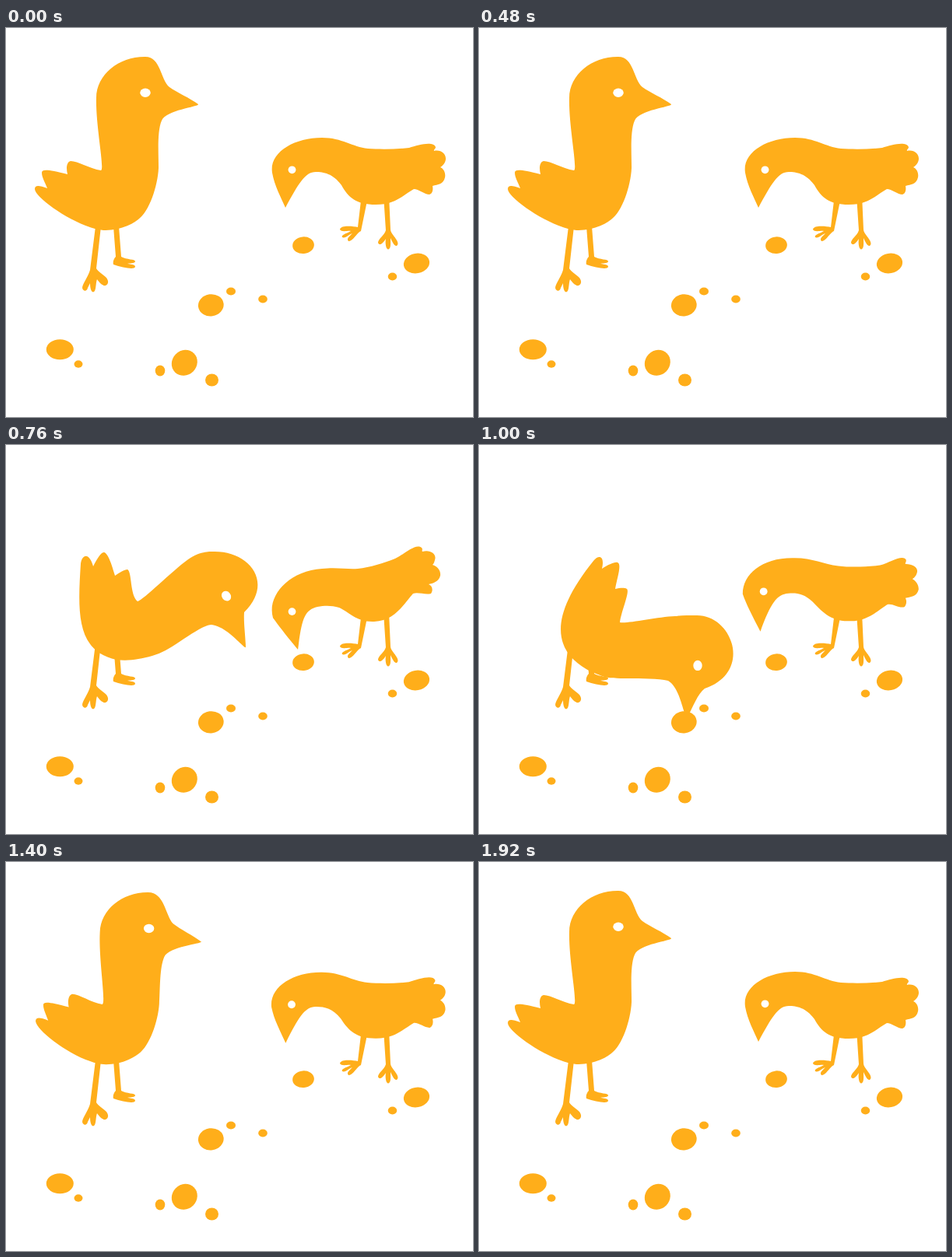
Recreate the animation shown at these times as an HTML page. Size 600 px wide and 500 px high, loop 1960 ms.

```html
<!DOCTYPE html>
<html lang="en">
<head>
<meta charset="utf-8">
<title>Pecking birds</title>
<style>
  html, body { margin: 0; width: 100%; height: 100%; overflow: hidden; background: #fff; }
  svg { display: block; width: 600px; height: 500px; }
</style>
</head>
<body>
<svg viewBox="0 0 600 500" fill="#ffae1a">
  <g id="pellets"></g>
  <!-- left legs -->
  <path d="M115 255L108 311C106 319 98 329 98 334C99 339 104 339 105 334L108 328C108 333 109 339 112 339.500C116 339 115 328 117 323C120 327 124 332 128 331C132 329 132 325 129 321C125 317 118 313 116 309L122 255Z"/>
  <path d="M138 255L145 255L148 294C155 298 166 297 166 300C166 303 158 302 156 303C162 304 166 304 166 307C165 311 150 308 138 304C137 300 139 296 141 294Z"/>
  <!-- right legs -->
  <path d="M456 222L452 256C446 255 430 253 429 259C431 263 440 260 443 261C438 264 430 266 432 269C436 271 441 265 445 264C441 268 437 271 440 274C445 275 451 263 456 261L464 222Z"/>
  <path d="M485 215L488 260C486 267 478 271 478 276C480 281 485 276 488 271C487 276 488 284 491 284.500C495 284 494 276 494 270C496 274 499 281 502 280C506 277 501 271 498 267C496 264 494 262 494 259L492 215Z"/>
  <path id="leftBody"/>
  <ellipse id="leftEye" rx="6.7" ry="5.7" fill="#fff"/>
  <path id="rightBody"/>
  <ellipse id="rightEye" rx="4.9" ry="4.9" fill="#fff"/>
</svg>
<script>
const LOOP = 1960, STEP = 40;
const $ = id => document.getElementById(id);

// cx, cy, rx, ry, tilt
const pellets = [
  [69.300, 413.300, 17.500, 13, 0], [93, 432, 5.500, 4.700, 0],
  [198, 440.500, 6.300, 6.900, 0], [229.300, 430.300, 17.200, 15.800, -45],
  [264.500, 452.500, 8.500, 8, 0], [263.300, 356.300, 16.400, 14.100, -8],
  [289, 338.500, 6, 5, 0], [330, 348.500, 5.800, 4.900, 0],
  [382, 279.200, 13.900, 10.800, -5], [527.500, 302.500, 16.700, 12.800, -10],
  [496.500, 319.500, 5.700, 5, 0]
];
$("pellets").innerHTML = pellets.map(([x, y, rx, ry, tilt]) =>
  `<ellipse rx="${rx}" ry="${ry}" transform="translate(${x} ${y}) rotate(${tilt})"/>`).join("");

// Each bird: three poses (upright, leaning, pecking) and the lean at which each occurs.
// Eye: x, y, tilt
const left = {
  body: $("leftBody"), eye: $("leftEye"),
  nodes: [0, 0.629, 0.983],
  eyes: [[179, 83.3, 0], [283, 194, 50], [281, 283.4, 90]],
  shapes: [
    `M37 207C37 202 42 202 53 206 C50 198 46 192 46 186 C46 181 55 182 79 188
     C77 180 78 172 83 171 C92 171 108 181 122 183 C127 182 115 125 116 90
     C116 60 145 37 178 37 C199 36 198 66 210 76 C220 83 236 90 247 98
     C249 101 206 105 200 119 C194 133 196 160 196 180 C195 203 184 236 170 246
     C159 255 142 260 128 260 C97 260 37 219 37 207Z`,
    `M96 152C98 140 107 138 112 156 C116 148 122 137 126 138 C131 139 136 154 140 168
     C146 164 152 160 156 160 C162 163 159 193 169 201 C177 199 212 163 234 147
     C248 137 258 137 268 137 C312 137 345 176 306 215 C305 228 308 248 308 260
     C306 262 284 233 264 231 C252 231 228 251 205 264 C194 270 182 273 170 275
     C160 277 150 277 142 276 C90 265 92 215 96 152Z`,
    `M147 149C153 141 162 141 158 159 C166 154 174 150 178 151 C184 153 177 172 175 185
     C181 184 186 183 190 185 C194 189 183 213 181 228 C190 230 228 221 252 220
     C262 219 270 219 280 219 C326 219 352 292 290 313 C281 320 275 336 268 350
     C263 353 260 313 243 303 C230 300 205 300 190 300 C180 300 165 300 158 297
     C153 295 149 293 145 292 C97 268 86 225 147 149Z`
  ]
};
const right = {
  body: $("rightBody"), eye: $("rightEye"),
  nodes: [0, 0.81, 1],
  eyes: [[367.5, 182.3, 0], [367.5, 214, 0], [370, 226.5, 0]],
  shapes: [
    `M359 231C353 217 345 203 342 186 C338 160 370 141 406 141 C432 141 445 153 465 155
     C480 156 500 156 518 154 C530 150 549 145 552 153 C552 156 549 156 550 158
     C558 156 565 161 565 168 C565 173 561 177 558 179 C563 181 565 187 564 192
     C562 201 555 201 548 203 C549 208 548 213 544 214 C538 214 530 207 524 207
     C510 215 500 227 475 227 C450 227 440 218 431 202 C420 187 408 185 398 185
     C384 185 376 200 359 231Z`,
    `M375 263C362 247 351 233 343 222 C335 195 362 162 406 159 C425 157 438 160 452 159
     C468 157 485 152 500 146 C513 140 526 126 534 132 C536 134 534 136 535 137
     C545 134 554 140 551 148 C550 152 549 153 548 154 C554 156 559 161 558 168
     C556 176 548 178 543 179 C548 181 549 187 546 191 C539 193 530 189 523 191
     C512 203 500 226 473 227 C450 228 440 214 428 209 C418 206 410 206 400 208
     C384 212 380 222 375 263Z`,
    `M382 272C370 262 358 252 348 238 C332 210 365 171 408 165 C425 162 437 164 448 161
     C465 156 480 148 492 140 C504 132 518 120 527 126 C529 127 527 129 528 130
     C538 124 547 131 545 140 C545 144 544 146 543 147 C550 148 555 154 553 161
     C551 168 545 171 540 172 C546 174 548 180 544 184 C537 184 529 183 522 183
     C512 197 502 225 472 228 C448 229 440 218 430 215 C420 212 410 213 402 215
     C386 220 384 232 382 272Z`
  ]
};

// Weights of the parabola that passes through all three poses.
function poseWeights(nodes, s) {
  return nodes.map((n, i) => nodes.reduce((w, m, j) => i === j ? w : w * (s - m) / (n - m), 1));
}

function setPose(bird, s) {
  const weights = poseWeights(bird.nodes, s);
  const mix = lists => lists[0].map((_, i) =>
    lists.reduce((sum, list, k) => sum + weights[k] * list[i], 0));
  const points = mix(bird.points);
  let i = 0;
  bird.body.setAttribute("d", bird.shapes[0].replace(/\d+/g, () => points[i++].toFixed(2)));
  const [x, y, tilt] = mix(bird.eyes);
  bird.eye.setAttribute("transform", `translate(${x} ${y}) rotate(${tilt})`);
}

for (const bird of [left, right])
  bird.points = bird.shapes.map(d => d.match(/\d+/g).map(Number));

// One slow peck, then rest.
function leftLean(t) {
  return t < 480 || t > 1440 ? 0 : Math.sin(Math.PI * (t - 480) / 960) ** 2;
}

// Four quick pecks: fast down, softer rise.
function rightLean(t) {
  const phase = t % 480;
  if (phase > 200) return 0.5 + 0.5 * Math.cos(Math.PI * (phase - 200) / 280);
  const u = phase / 200;
  return 0.3 * u * u * (3 - 2 * u) + 0.7 * Math.sin(Math.PI * u / 2);
}

const start = performance.now();
function draw() {
  const elapsed = (performance.now() - start) % LOOP;
  const t = Math.floor(elapsed / STEP) * STEP;
  setPose(left, leftLean(t));
  setPose(right, rightLean(t));
  requestAnimationFrame(draw);
}
draw();
</script>
</body>
</html>
```
